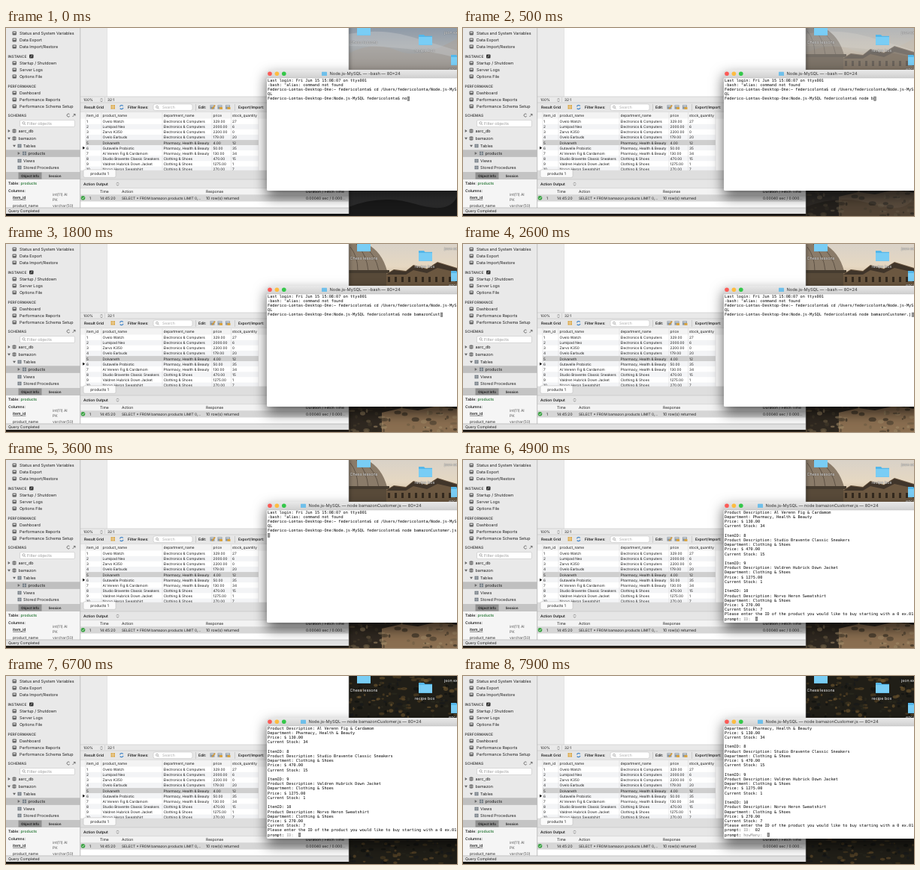
Animation, 600 px wide and 252 px high, one loop 8 s. Source, as an HTML page:

```html
<!DOCTYPE html>
<html lang="en">
<head>
<meta charset="utf-8">
<style>
  html, body { margin: 0; width: 100%; height: 100%; overflow: hidden; background: #222; }
  svg { display: block; width: 600px; height: 252px; }
  text { font-family: Inter, "Liberation Sans", sans-serif; white-space: pre; text-rendering: geometricPrecision; }
  .mono text { font-family: "DejaVu Sans Mono", monospace; font-size: 5.23px; }
  .label text { text-shadow: 0 .5px 1px #000; }
</style>
</head>
<body>
<svg id="stage" viewBox="0 0 600 252"></svg>
<script>
const LOOP = 8000;
const USER = "federicolonta", HOST = "Federico-Lontas-Desktop-One";
const COMMAND = "node bamazonCustomer.js";
const CHAR = 3.15, LINE = 6.22;

const TECH = "Electronics & Computers", CARE = "Pharmacy, Health & Beauty", WEAR = "Clothing & Shoes";
const products = [
  ["Ovelo Watch", TECH, "329.00", 27],
  ["Lumipad Neo", TECH, "2000.00", 6],
  ["Zarvo K350", TECH, "2200.00", 0],
  ["Ovelo Earbuds", TECH, "179.00", 20],
  ["Dolvaneth", CARE, "4.00", 12],
  ["Gutavelle Probiotic", CARE, "50.00", 35],
  ["Al Verenn Fig & Cardamom", CARE, "130.00", 34],
  ["Studio Bravente Classic Sneakers", WEAR, "470.00", 15],
  ["Valdren Hubrick Down Jacket", WEAR, "1275.00", 1],
  ["Norvo Heron Sweatshirt", WEAR, "270.00", 7]
];

const esc = s => String(s).replace(/&/g, "&amp;").replace(/</g, "&lt;");
const rect = (x, y, w, h, fill, more = "") =>
  `<rect x="${x}" y="${y}" width="${w}" height="${h}" fill="${fill}" ${more}/>`;
const dot = (x, y, r, fill, more = "") => `<circle cx="${x}" cy="${y}" r="${r}" fill="${fill}" ${more}/>`;
const path = (d, fill, more = "") => `<path d="${d}" fill="${fill}" ${more}/>`;
const stroke = (d, color, w = .6) => path(d, "none", `stroke="${color}" stroke-width="${w}"`);
// y is the vertical middle of the lower-case letters
const text = (x, y, s, size = 5.4, fill = "#1c1c1c", more = "") =>
  `<text x="${x}" y="${y + 1.9}" font-size="${size}" fill="${fill}" ${more}>${esc(s)}</text>`;
const bold = 'font-weight="600" ', middle = 'text-anchor="middle" ';
const label = (x, y, s) => text(x, y, s, 4.9, "#1c1c1c", bold);
const arrow = (x, y, open) =>
  path(open ? `M${x - 2} ${y - 1.3}h4l-2 3z` : `M${x - 1.3} ${y - 2}v4l3-2z`, "#666");
const updown = (x, y) =>
  stroke(`M${x} ${y - .5}l1.5-1.6 1.5 1.6m-3 1.2l1.5 1.6 1.5-1.6`, "#555");
const gradient = (id, ...stops) => `<linearGradient id="${id}" x2="0" y2="1">` +
  stops.map(([at, c]) => `<stop offset="${at}" stop-color="${c}"/>`).join("") + "</linearGradient>";

function random(seed) {
  return () => (seed = seed * 16807 % 2147483647) / 2147483647;
}

function wallpaper() {
  const rnd = random(41);
  const num = (from, span) => (from + rnd() * span).toFixed(1);
  const specks = (count, colors, x, w, y, h, size) => {
    let out = "";
    for (let i = 0; i < count; i++)
      out += `<ellipse cx="${num(x, w)}" cy="${num(y, h)}" rx="${num(1, size)}" ry="${num(1, size / 2)}" fill="${colors[i % colors.length]}" opacity=".6"/>`;
    return out;
  };
  const haze = rect(0, 0, 600, 252, "url(#haze)") +
    path("M456 34Q490 16 520 30T600 14V58H456z", "#a9a39b", 'opacity=".55"') +
    path("M456 8Q500 0 540 12T600 30V40Q540 24 456 24z", "#c3c5c8", 'opacity=".45"') +
    path("M0 252V240H456Q500 222 545 236T600 226V252z", "#191919");

  const stone = ["#2c261d", "#6d5b43", "#a08865", "#443a2c"];
  let windows = "";
  for (let x = 508; x < 600; x += 9) windows += rect(x, 44, 3, 7, "#33291e");
  const dome = rect(0, 0, 600, 252, "#2f2820") + rect(456, 0, 144, 60, "url(#sky)") +
    path("M456 58V0H480Q500 10 507 36V58z", "#8a7b69") +
    stroke("M466 0Q480 14 482 36M474 0Q492 14 496 36M458 4Q468 16 468 36", "#5e5245", 1) +
    path("M456 35H510V39H456z", "#463c30") +
    path("M506 58V40l10-6 16 2 10-8 18 5 14-9 26 8V58z", "#6b5740") +
    path("M506 41l10-6 16 2 10-8 18 5 14-9 26 8v5l-26-6-14 7-18-4-10 6z", "#40352a") + windows +
    rect(456, 39, 50, 19, "#584a39") +
    path("M500 252V226l26-6 22 3 26-6 26 4v31z", "#8a6e50") +
    specks(70, stone, 456, 144, 217, 35, 4);

  const forest = rect(0, 0, 600, 252, "#201e17") +
    specks(170, ["#0d0f0d", "#5a4525", "#2b2a1e", "#755a30", "#15171a"], 456, 144, 0, 58, 3) +
    specks(100, ["#0d0f0d", "#4f3d22", "#26251c", "#674e2b", "#15171a"], 456, 144, 215, 37, 3);
  return haze + `<g id="dome">${dome}</g><g id="forest">${forest}</g>`;
}

function folders() {
  const folder = (x, y) => path(`M${x} ${y}h7l1.5 1.7H${x + 18}v12H${x}z`, "#54b7ea") +
    rect(x, y + 3, 18, 10.7, "#79cdf5");
  const name = (x, y, s, more) => text(x, y, s, 5.4, "#fff", more);
  return folder(467, -4) + folder(549, 9) + folder(592, 36) + '<g class="label">' +
    name(476, 19, "Chess lessons", middle) + name(557, 30, "recipe box", middle) +
    name(583, 6, "json exam") + name(589, 55, "encode") + "</g>";
}

function sidebar() {
  let out = rect(0, 0, 98.5, 249, "#e9e9e9");
  const item = (y, s) => rect(8.5, y - 2.6, 5.4, 5.2, "#666", 'rx="1"') +
    rect(9.6, y - 1.4, 3.2, 1.4, "#ddd") + text(18, y, s);
  const head = (y, s) => text(2.5, y, s, 4.9, "#444", bold);
  out += item(7, "Status and System Variables") + item(16, "Data Export") + item(25, "Data Import/Restore") +
    head(38, "INSTANCE") + rect(31, 35.5, 5.5, 5, "#333", 'rx="1"') + stroke("M32.4 39l2.6-2.2", "#ddd", .8) +
    item(47, "Startup / Shutdown") + item(56, "Server Logs") + item(65, "Options File") +
    head(78, "PERFORMANCE") +
    item(87, "Dashboard") + item(96, "Performance Reports") + item(105, "Performance Schema Setup") +
    head(117, "SCHEMAS") + stroke("M84.5 115.6a2 2 0 1 0 .3 2.4M88.5 119l3.5-3.5m-2.2 0h2.2v2.2", "#444", .7) +
    rect(18.5, 123.5, 73, 9, "#fff", 'rx="1.5" stroke="#bbb" stroke-width=".5"') +
    dot(23.5, 127.3, 1.6, "none", 'stroke="#777" stroke-width=".6"') + stroke("M24.6 128.5l1.6 1.6", "#777") +
    text(28, 128, "Filter objects", 5.4, "#999");

  const db = y => path(`M8.5 ${y - 2}q2.5-1.4 5 0v4q-2.5 1.4-5 0z`, "#777") + stroke(`M8.5 ${y}h5`, "#ddd");
  const grid = (x, y) => rect(x, y - 2.3, 5, 4.6, "#6d7780") + stroke(`M${x} ${y}h5m-2.5-2.3v4.6`, "#ddd", .5);
  out += rect(0, 163.3, 98.5, 9.6, "#bfbfbf") +
    arrow(4, 138, false) + db(138) + text(16.5, 138, "aarc_db") +
    arrow(4, 148, true) + db(148) + text(16.5, 148, "bamazon") +
    arrow(11, 158, true) + grid(15.5, 158) + text(23, 158, "Tables") +
    arrow(17, 168, false) + grid(22, 168) + text(29.5, 168, "products") +
    grid(15.5, 178) + text(23, 178, "Views") + grid(15.5, 187) + text(23, 187, "Stored Procedures");

  const small = (x, y, s, fill, more) => text(x, y, s, 5, fill, more);
  out += rect(0, 193, 98.5, 10, "#c4c4c4") + rect(16.5, 193.5, 31, 9, "#8f8f8f") +
    text(32, 198, "Object Info", 4.5, "#151515", bold + middle) +
    text(65, 198, "Session", 4.5, "#222", bold + middle) +
    rect(0, 203, 98.5, 38, "#f5f5f5") +
    small(3, 208, "Table: ", "#222", bold) + small(19.5, 208, "products", "#2c7a3b", bold) +
    small(3, 218, "Columns:", "#222", bold) +
    small(9, 227, "item_id", "#222", bold + 'text-decoration="underline"') +
    small(62, 223, "int(11) AI", "#555") + small(62, 230, "PK", "#555") +
    small(9, 238, "product_name", "#222") + small(62, 238, "varchar(50)", "#555");
  return out + stroke("M98.7 0V241", "#aaa", .7);
}

function resultGrid() {
  const sheet = x => rect(x, 103.3, 6, 5.4, "#8d99a5") + rect(x + .8, 104.2, 4.4, 1, "#dfe5ea");
  let out = rect(99, 100, 357, 12.5, "#e6e6e6") + stroke("M99 100h357M99 112.5h357", "#bbb", .5) +
    label(104, 106, "Result Grid") +
    rect(139.5, 103.3, 5.5, 5.2, "#d9a441") + stroke("M139.5 105.9h5.5m-2.75-2.6v5.2", "#fff", .5) +
    stroke("M151.5 105.4a2.3 2.3 0 0 1 4.2-.8M155.9 106.8a2.3 2.3 0 0 1-4.2.8", "#3f83c8", 1.2) +
    label(162, 106, "Filter Rows:") +
    rect(196, 102, 52, 8.6, "#fff", 'rx="2.5" stroke="#bbb" stroke-width=".5"') +
    dot(201, 105.8, 1.5, "none", 'stroke="#888" stroke-width=".6"') + stroke("M202 107l1.5 1.5", "#888") +
    text(208, 106.3, "Search", 5, "#aaa") + stroke("M252.5 102v9M304.5 102v9", "#bbb") +
    label(256, 106, "Edit:") +
    sheet(271.5) + path("M273.5 108l4-5 1.3 1-4 5z", "#d49a3a") +
    sheet(281.5) + rect(284, 106, 4, 3, "#d9a441") +
    sheet(292) + rect(294.5, 106, 4, 3, "#d9a441") +
    label(309, 106, "Export/Import:") +
    rect(99, 112.8, 357, 78, "#fff") + rect(99, 113, 357, 8.6, "#f3f3f3");
  const columns = [107, 128.5, 209.5, 275.5, 301];
  ["item_id", "product_name", "department_name", "price", "stock_quantity"]
    .forEach((s, i) => out += text(columns[i], 117.3, s, 4.8));
  products.forEach((row, i) => {
    const y = 125.2 + 7.1 * i;
    const fill = i === 4 ? "#cfcfcf" : i % 2 ? "#f3f4f6" : "#fff";
    out += rect(106, y - 3.5, 230, 7.1, fill);
    [i + 1, ...row].forEach((s, c) => out += text(columns[c], y, s, 4.75));
  });
  out += path("M102 158.8v4l3.2-2z", "#111") +
    stroke("M106 113v78M127 113v78M208 113v78M274 113v78M299.5 113v78M336 113v78", "#d4d4d4", .5);
  return out + rect(99, 190.7, 357, 12.3, "#dedede") +
    rect(103, 189.8, 43, 10.5, "#fafafa", 'rx="2" stroke="#b5b5b5" stroke-width=".5"') +
    text(124.5, 195, "products 1", 5, "#1c1c1c", middle);
}

function editor() {
  return rect(-10, -10, 466, 259, "#fff", 'filter="url(#shadow)"') +
    rect(99, 0, 35.5, 92, "#ebebeb") + stroke("M134.5 0v92", "#d5d5d5", .5) +
    rect(99, 92, 357, 8, "#e9e9e9") + stroke("M99 92h357M131.5 93v6", "#bbb", .5) +
    text(103, 96.5, "100%", 4.8) + updown(125.5, 96.5) + text(135, 96.5, "32:1", 4.8) + resultGrid() +
    rect(99, 203, 357, 12, "#e6e6e6") + stroke("M99 203h357M99 215h357M99 223.3h357", "#bbb", .5) +
    label(103, 209, "Action Output") + updown(147, 209) +
    rect(99, 215.3, 357, 8, "#f3f3f3") + rect(99, 223.5, 357, 9, "#d6d6d6") +
    text(125, 219.2, "Time", 5) + text(154, 219.2, "Action", 5) + text(266, 219.2, "Response", 5) +
    text(399, 219.2, "Duration / Fetch Time", 5) +
    dot(102.5, 227.7, 2.8, "#3ba243") + stroke("M101 227.7l1.2 1.2 2-2.4", "#fff", .7) +
    text(111, 227.7, "1", 5) + text(125, 227.7, "14:45:20", 5) +
    text(154, 227.7, "SELECT * FROM bamazon.products LIMIT 0,...", 4.8) +
    text(266, 227.7, "10 row(s) returned", 5.1) + text(399, 227.7, "0.00040 sec / 0.000...", 5) +
    sidebar() + rect(0, 241, 456, 8, "#e2e2e2") + stroke("M0 241h456M456 0v249", "#aaa", .6) +
    text(3, 245.3, "Query Completed", 5);
}

function terminal() {
  return rect(347, 56, 270, 162, "#fff", 'rx="2.5" filter="url(#deepShadow)"') +
    path("M347 67V58.5q0-2.5 2.5-2.5H610v11z", "url(#bar)") + stroke("M347 67h253", "#b0b0b0", .5) +
    dot(351, 61.2, 2.8, "#fc5b57") + dot(360.4, 61.2, 2.8, "#fdbc40") + dot(369.8, 61.2, 2.8, "#34c84a") +
    '<g id="title"></g><g id="screen" class="mono"></g>';
}

const shadow = (id, dy, blur, opacity) =>
  `<filter id="${id}" x="-20%" y="-20%" width="140%" height="150%">` +
  `<feDropShadow dx="0" dy="${dy}" stdDeviation="${blur}" flood-opacity="${opacity}"/></filter>`;

const stage = document.getElementById("stage");
stage.innerHTML = "<defs>" +
  gradient("haze", [0, "#8e9aa8"], [.1, "#a9adb0"], [.23, "#8c8883"], [.86, "#3b3b3c"], [1, "#202020"]) +
  gradient("sky", [0, "#d9d2c8"], [.5, "#e6d8c2"], [1, "#b89e7e"]) +
  gradient("bar", [0, "#e9e9e9"], [1, "#d0d0d0"]) +
  shadow("shadow", 2, 3, .5) + shadow("deepShadow", 8, 9, .65) + "</defs>" +
  wallpaper() + folders() + editor() + terminal();

const [dome, forest, title, screen] = ["dome", "forest", "title", "screen"].map(id => document.getElementById(id));

const intro = [
  "Last login: Fri Jun 15 15:08:07 on ttys001",
  '-bash: "alias: command not found',
  `${HOST}:~ ${USER}$ cd /Users/${USER}/Node.js-MyS`,
  "QL"
];
const listing = products.flatMap(([name, department, price, stock], i) => [
  `ItemID: ${i + 1}`, `Product Description: ${name}`, `Department: ${department}`,
  `Price: $ ${price}`, `Current Stock: ${stock}`, ""
]).slice(0, -1);

function screenLines(t) {
  const typed = Math.floor(t < 1100 ? 2 + t / 122 : 11 + (t - 1100) / 136);
  const lines = [...intro, `${HOST}:Node.js-MySQL ${USER}$ ${COMMAND.slice(0, typed)}`];
  if (t >= 4000) {
    const answer = t < 7200 ? "" : t < 7400 ? "0" : "02";
    lines.push(...listing, "Please enter the ID of the product you would like to buy starting with a 0 ex.01",
      "prompt: ID:  " + answer);
    if (t >= 7700) lines.push("prompt: howMany:  ");
  } else if (t >= 3000) lines.push("");
  return lines.slice(-24);
}

function drawLine(s, row) {
  const [, start, key, rest] = s.match(/^(prompt: )(\w+:)(.*)$/) || [];
  const body = key ? `${start}<tspan fill="#888">${key}</tspan>${rest}` : esc(s);
  return `<text x="348" y="${(71.6 + row * LINE).toFixed(2)}" fill="#000">${body}</text>`;
}

let shown = "";
function draw(now) {
  const t = now % LOOP;
  const fade = (from, length) => Math.min(1, Math.max(0, (t - from) / length));
  dome.style.opacity = fade(0, 1000);
  forest.style.opacity = fade(5000, 1500);

  const lines = screenLines(t), running = t >= 3000, state = running + lines.join("\n");
  if (state !== shown) {
    shown = state;
    const name = `Node.js-MySQL — ${running ? "node bamazonCustomer.js" : "-bash"} — 80×24`;
    title.innerHTML = rect(running ? 392 : 420, 58.8, 7, 5.2, "#6fbfea", 'rx=".6"') +
      text(477.5, 61.4, name, 5.7, "#333", middle);
    const row = lines.length - 1, x = 348 + lines[row].length * CHAR;
    screen.innerHTML = lines.map(drawLine).join("") +
      rect(x + .3, 67.2 + row * LINE, 2.6, 5.4, "#a0a0a0", 'stroke="#555" stroke-width=".5"');
  }
  requestAnimationFrame(draw);
}
requestAnimationFrame(draw);
</script>
</body>
</html>
```
